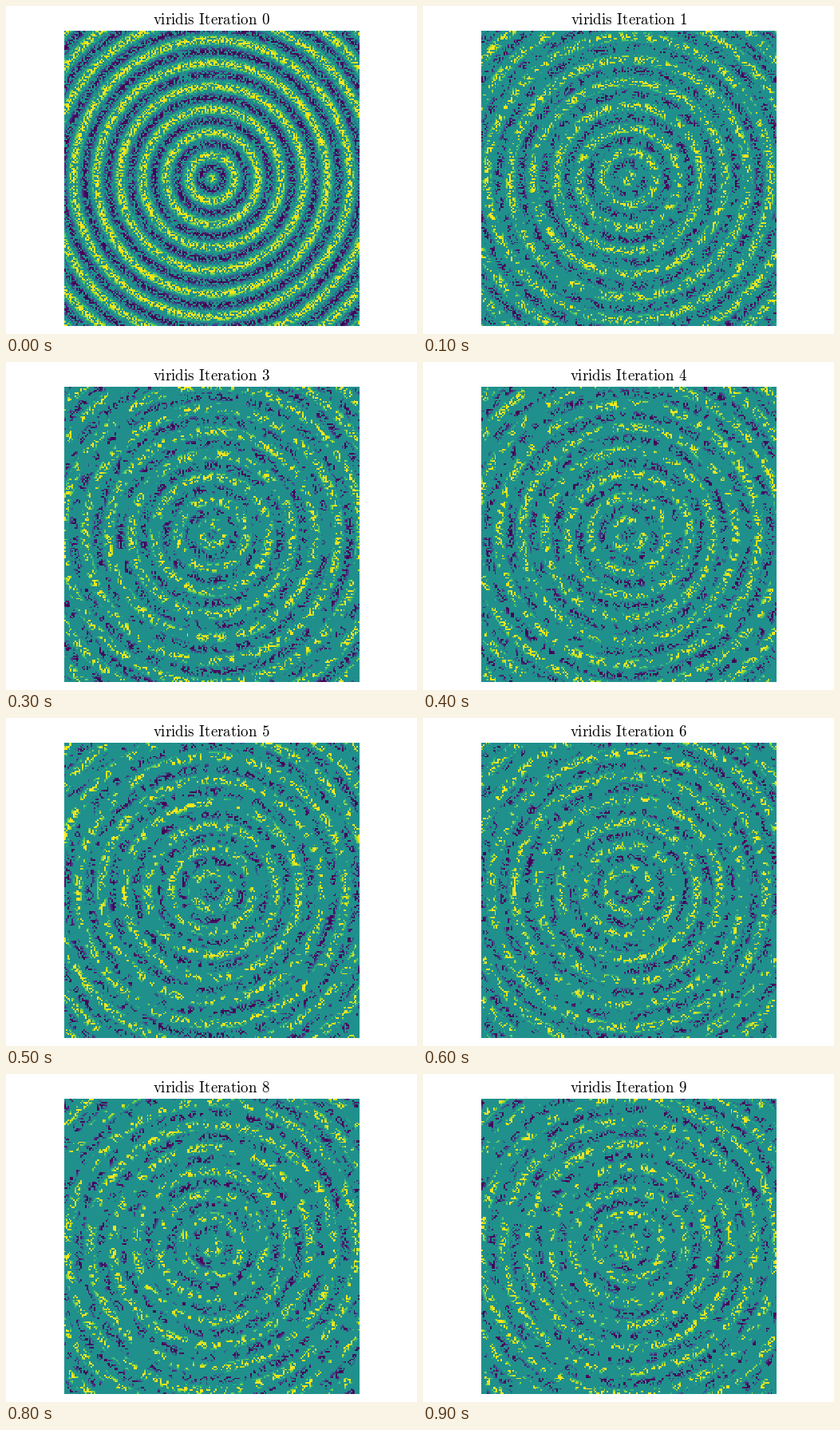
Recreate the animation shown at these times as a matplotlib script. Size 515 by 411 pixels, loop 1000 ms.

```python
import numpy as np
import matplotlib.pyplot as plt
from matplotlib.animation import FuncAnimation

WIDTH, HEIGHT, DPI = 515, 411, 100
CELLS = 200
STEPS = 10
LEFT, BOTTOM, SIDE = 73, 10, 370


def life_step(alive):
    """One generation of Conway's Game of Life on a torus."""
    neighbours = sum(
        np.roll(alive, (dy, dx), axis=(0, 1))
        for dy in (-1, 0, 1) for dx in (-1, 0, 1) if (dy, dx) != (0, 0)
    )
    return ((neighbours == 3) | ((alive == 1) & (neighbours == 2))).astype(int)


np.random.seed(0)
generations = [np.random.randint(0, 2, (CELLS, CELLS))]
while len(generations) < STEPS:
    generations.append(life_step(generations[-1]))

axis = np.linspace(-40, 40, CELLS)
radius = np.hypot(*np.meshgrid(axis, axis))


def field(step):
    """Living cells lit by a circular wave that travels outwards."""
    return generations[step] * np.cos(radius - step)


def caption(step):
    gap = r"\ \hspace{0.07}"
    return rf"$\mathrm{{viridis{gap}Iteration{gap}{step}}}$"


fig = plt.figure(figsize=(WIDTH / DPI, HEIGHT / DPI), dpi=DPI, facecolor="white")
ax = fig.add_axes([LEFT / WIDTH, BOTTOM / HEIGHT, SIDE / WIDTH, SIDE / HEIGHT])
ax.axis("off")
image = ax.imshow(field(0), cmap="viridis", vmin=-1, vmax=1,
                  interpolation="nearest", aspect="auto")
title = fig.text((LEFT + SIDE / 2) / WIDTH, 1 - 23 / HEIGHT, caption(0),
                 ha="center", va="baseline", fontsize=13.65,
                 math_fontfamily="cm", color="black")


def update(step):
    image.set_data(field(step))
    title.set_text(caption(step))
    return image, title


anim = FuncAnimation(fig, update, frames=STEPS, interval=100,
                     repeat=True, repeat_delay=0, blit=False)
plt.show()
```
